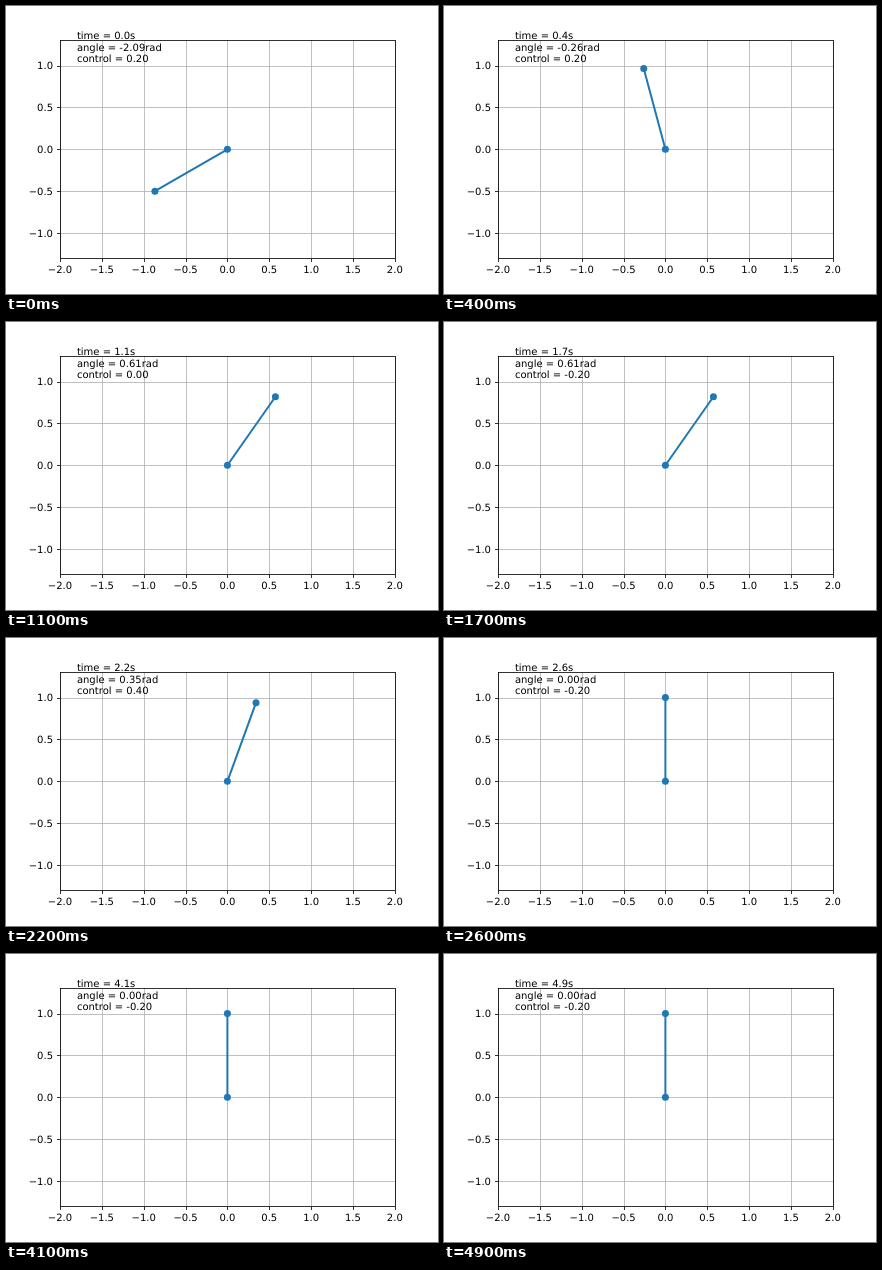
An HTML page that plays this animation: 432x288 px, repeating every 5 s.

```html
<!DOCTYPE html>
<html lang="en">
<head>
<meta charset="utf-8">
<title>Pendulum control</title>
<style>
  html, body { margin: 0; width: 100%; height: 100%; overflow: hidden; background: #fff; }
  svg { display: block; width: 432px; height: 288px; }
  text { font: 10px "DejaVu Sans", sans-serif; fill: #000; text-rendering: geometricPrecision; white-space: pre; }
  .grid { stroke: #b0b0b0; stroke-width: .8; }
  .axis { stroke: #000; stroke-width: .8; fill: none; }
  .rod { stroke: #1f77b4; stroke-width: 2; }
  .dot { fill: #1f77b4; }
</style>
</head>
<body>
<svg id="plot" viewBox="0 0 432 288"></svg>
<script>
const svg = document.getElementById('plot');
const UNIT = 83.7, CX = 221.4, CY = 143.3;
const LOOP = 5000, STEP = 100;

const px = x => CX + x * UNIT;
const py = y => CY - y * UNIT;
const snap = v => Math.floor(v + 0.5) + 0.5;

function add(tag, attrs, content = '') {
  const el = document.createElementNS('http://www.w3.org/2000/svg', tag);
  for (const key in attrs) el.setAttribute(key, attrs[key]);
  el.textContent = content;
  return svg.appendChild(el);
}
const line = (cls, x1, y1, x2, y2) => add('line', { class: cls, x1, y1, x2, y2 });
const label = (x, y, anchor, str) => add('text', { x, y, 'text-anchor': anchor }, str);
const tickText = v => v.toFixed(1).replace('-', '\u2212');

const left = snap(px(-2)), right = snap(px(2));
const top_ = snap(py(1.3)), bottom = snap(py(-1.3));
const xTicks = Array.from({ length: 9 }, (_, i) => i / 2 - 2);
const yTicks = Array.from({ length: 5 }, (_, i) => i / 2 - 1);

for (const v of xTicks) line('grid', snap(px(v)), top_, snap(px(v)), bottom);
for (const v of yTicks) line('grid', left, snap(py(v)), right, snap(py(v)));

const rod = line('rod', CX, CY, CX, CY);
add('circle', { class: 'dot', cx: CX, cy: CY, r: 3.5 });
const bob = add('circle', { class: 'dot', r: 3.5 });

for (const v of xTicks) {
  const x = snap(px(v));
  line('axis', x, bottom, x, bottom + 3.5);
  label(px(v), 267, 'middle', tickText(v));
}
for (const v of yTicks) {
  const y = snap(py(v));
  line('axis', left, y, left - 3.5, y);
  label(47, Math.round(py(v) + 3.8), 'end', tickText(v));
}
add('rect', { class: 'axis', x: left, y: top_, width: right - left, height: bottom - top_ });

const info = [33, 45, 56].map(y => label(70.9, y, 'start', ''));

// [first step, value]; each value holds until the next entry
const angles = [
  [0, -120], [1, -85], [2, -55], [3, -30], [4, -15], [5, -5], [6, 5], [7, 15],
  [8, 20], [9, 25], [10, 30], [11, 35], [20, 30], [21, 25], [22, 20], [23, 10],
  [24, 5], [25, 0]
];
const controls = [
  [0, 0.2], [6, 0], [13, -0.2], [20, 0.2], [21, 0.4], [24, 0.2], [25, -0.2]
];
const valueAt = (table, n) => table.filter(([from]) => from <= n).pop()[1];

function draw(n) {
  const a = valueAt(angles, n) * Math.PI / 180;
  const x = px(Math.sin(a)), y = py(Math.cos(a));
  rod.setAttribute('x2', x);
  rod.setAttribute('y2', y);
  bob.setAttribute('cx', x);
  bob.setAttribute('cy', y);
  info[0].textContent = `time = ${(n / 10).toFixed(1)}s`;
  info[1].textContent = `angle = ${a.toFixed(2)}rad`;
  info[2].textContent = `control = ${valueAt(controls, n).toFixed(2)}`;
}

const start = performance.now();
let shown = 0;
function tick() {
  const t = Math.max(0, performance.now() - start) % LOOP;
  const n = Math.floor(t / STEP);
  if (n !== shown) draw(shown = n);
  requestAnimationFrame(tick);
}
draw(0);
requestAnimationFrame(tick);
</script>
</body>
</html>
```
